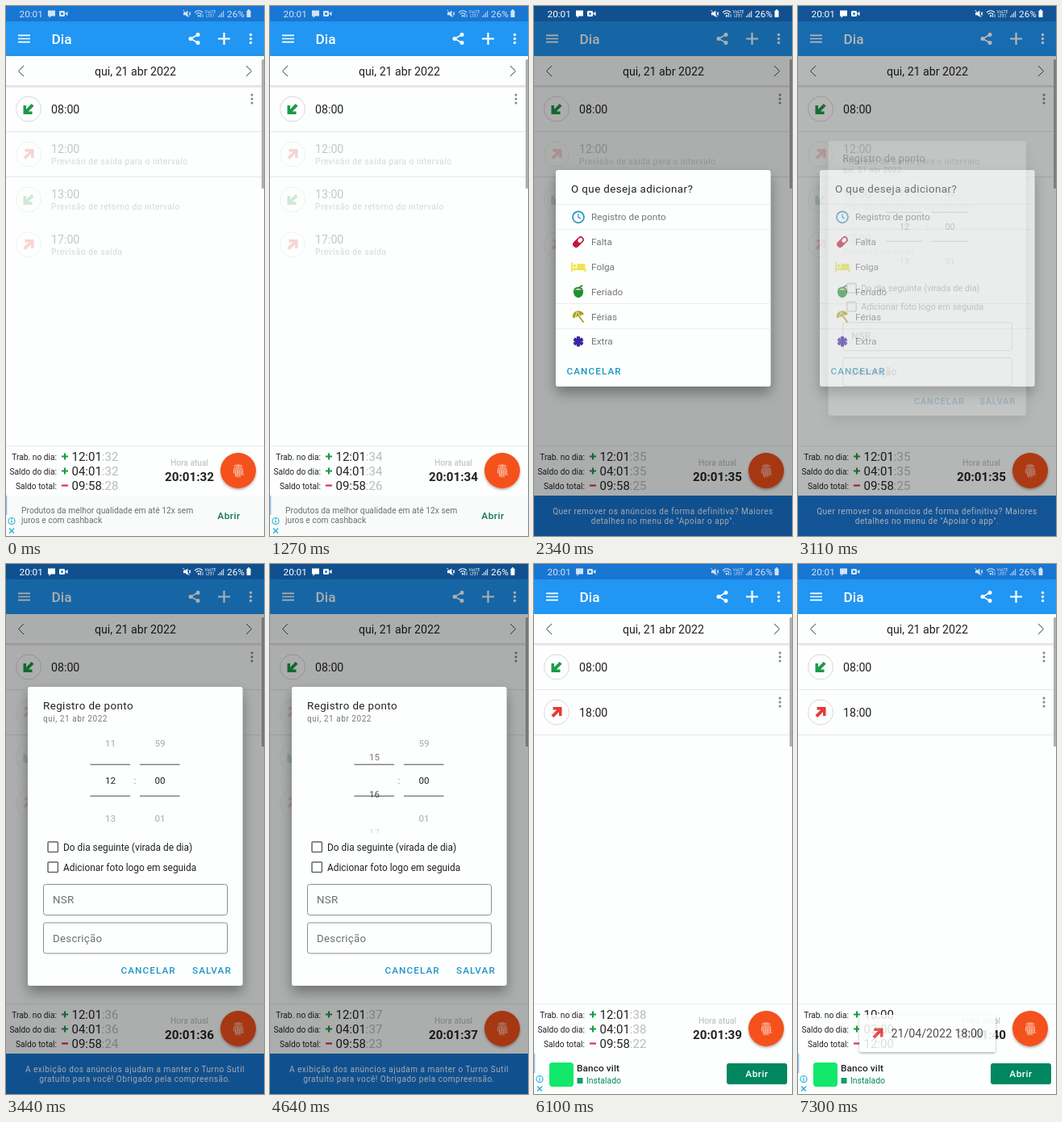
An HTML page for the animation above (7.65 s loop, 320x656 px).

```html
<!DOCTYPE html>
<html lang="pt">
<head>
<meta charset="utf-8">
<title>Registro de ponto</title>
<style>
html, body { margin: 0; width: 100%; height: 100%; overflow: hidden; background: #fdfefe; }
svg { display: block; width: 100%; height: 100%; }
text { font-family: Roboto, "Noto Sans", sans-serif; white-space: pre; }
</style>
</head>
<body>
<svg id="stage" viewBox="0 0 320 656" xmlns="http://www.w3.org/2000/svg"></svg>
<script>
const LOOP = 7650;
const BLUE = '#2196f3', DEEP = '#1976d2', GREEN = '#1a9a48', RED = '#e53935', ACCENT = '#1c94c2', INK = '#222';

const text = (x, y, size, str, fill = INK, more = '') =>
  `<text x="${x}" y="${y}" font-size="${size}" fill="${fill}" ${more}>${str}</text>`;
const rect = (x, y, w, h, fill, more = '') =>
  `<rect x="${x}" y="${y}" width="${w}" height="${h}" fill="${fill}" ${more}/>`;
const dot = (x, y, r, fill, more = '') =>
  `<circle cx="${x}" cy="${y}" r="${r}" fill="${fill}" ${more}/>`;
const path = (d, stroke, width, more = '') =>
  `<path d="${d}" fill="none" stroke="${stroke}" stroke-width="${width}" ${more}/>`;
const at = (x, y, body, more = '') => `<g transform="translate(${x} ${y}) ${more}">${body}</g>`;
const group = (id, body) => `<g id="${id}">${body}</g>`;
const dots = (x, y, gap, r, fill) => [-gap, 0, gap].map(d => dot(x, y + d, r, fill)).join('');
const middle = 'text-anchor="middle"';
const end = 'text-anchor="end"';
const spaced = n => `letter-spacing="${n}"`;
const medium = n => `font-weight="500" ${spaced(n)}`;

// Arrow pointing down-left for an entry, up-right for an exit
const arrow = (x, y, out) => at(x, y,
  `<path d="M-6.5 6.5V-4.5H-3V.2L3.8-6.5L6.5-3.8L-.2 3H4.500V6.500Z" fill="${out ? RED : GREEN}"/>`,
  out ? 'rotate(180)' : '');

const punch = (y, time, out) =>
  dot(28, y, 15.5, '#fff', 'stroke="#d8d8d8"') + arrow(28, y, out) +
  text(56, y + 5.3, 14.2, time) + dots(305, y - 12.5, 5, 1.5, '#858585');

const forecast = (y, time, note, out) =>
  `<g opacity=".2">${dot(28, y, 15.5, '#fff', 'stroke="#bbb"')}${arrow(28, y, out)}</g>` +
  text(56, y - 1.7, 14.2, time, '#c6c8c8') +
  text(56, y + 12.8, 10.2, note, '#d6d8d8', spaced(0.5));

function statusIcons() {
  const c = '#fff';
  const bars = [0, 1, 2, 3].map(i => rect(263 + i * 2, 12 - i * 2, 1.2, 2 + i * 2, c, 'opacity=".75"')).join('');
  return text(16.5, 14, 11.8, '20:01', c) +
    `<path d="M52 5.5h9v7h-5l-2.5 2.3v-2.3H52Z" fill="${c}"/>` +
    rect(66, 6, 7, 7, c, 'rx="1.3"') + `<path d="M73 9.5L76.5 6.7v5.6Z" fill="${c}"/>` + dot(69.5, 9.5, 1.5, DEEP) +
    `<path d="M220 8h2.4l3-2.6v8.4l-3-2.6H220Z" fill="${c}"/>` +
    path('M219.500 5l8 9M227 7.500l2 4M229 7.500l-2 4', c, 0.9) +
    path('M234 8q5-4.500 10 0M235.800 10q3.200-2.600 6.400 0', c, 1.1) + dot(239, 12.3, 1.2, c) +
    path('M241.500 10v4M244 10v4', c, 0.8) +
    text(253.5, 9, 5, 'VoLTE', c, middle) + text(253.5, 14, 5, 'LTE1', c, middle) + bars +
    text(274, 14, 11.8, '26%', c) +
    rect(298.5, 5.5, 5, 8.5, c, 'rx=".8"') + rect(300, 4.3, 2, 1.5, c);
}

function topBar() {
  return rect(0, 0, 320, 19, DEEP) + rect(0, 19, 320, 43, BLUE) +
    path('M15 36.300H30M15 40.500H30M15 44.700H30', '#fff', 1.7) +
    text(56.5, 47, 17.2, 'Dia', '#fff', 'font-weight="500"') +
    path('M238 35.500L229 40.500L238 45.500', '#fff', 1.5) +
    dot(238, 35.5, 2.5, '#fff') + dot(229, 40.5, 2.5, '#fff') + dot(238, 45.5, 2.5, '#fff') +
    path('M263 40.500H278M270.500 33V48', '#fff', 2.2) +
    dots(303.5, 40.5, 5, 1.7, '#fff') +
    rect(0, 62, 320, 37, '#fdfefe') +
    path('M22 74L15.500 80.500L22 87M298 74L304.500 80.500L298 87', '#444', 1) +
    text(160.5, 86, 14.2, 'qui, 21 abr 2022', INK, middle) +
    rect(0, 98.5, 320, 1, '#c9caca') + rect(0, 99.5, 320, 1.5, '#ebecec');
}

function fingerprint() {
  const ridges = [1.7, 3.6, 5.5].map((r, i) =>
    `M${-r} ${4.5 - i}V0A${r} ${r} 0 0 1 ${r} 0V${4 - i * 0.4}Q${r} ${5.8 - i * 0.4} ${r + 1} ${5.8 - i * 0.4}`).join('');
  return path(ridges + 'M0 0V3.500Q0 6.500 2.500 7.500M-1.700 4.500Q-1.500 7-.2 8M-3.600 3.500Q-3.500 6-2.600 7.500M-5-5.800Q0-9 5-5.800',
    '#ffe5da', 0.9, 'stroke-linecap="round"');
}

function footer() {
  const row = (i, label) => {
    const y = 557.5 + i * 18;
    return text(63, y + 4, 10.2, label, INK, end) +
      path(`M69 ${y}h8` + (i < 2 ? `M73 ${y - 4}v8` : ''), i < 2 ? GREEN : '#d32f4f', 2.1) +
      `<text x="81.500" y="${y + 5.3}" font-size="15" fill="${INK}"><tspan id="main${i}"></tspan><tspan id="sec${i}" fill="#b9bbbb"></tspan></text>`;
  };
  return rect(0, 544, 320, 1.2, '#eceeee') +
    ['Trab. no dia:', 'Saldo do dia:', 'Saldo total:'].map((s, i) => row(i, s)).join('') +
    text(227.5, 569, 10.2, 'Hora atual', '#b9bbbb', middle) +
    text(227.5, 587.6, 15.2, '', INK, middle + ' font-weight="700" id="clock"') +
    dot(288, 575, 22, '#f4511e', 'filter="url(#small)"') + at(288, 575.3, fingerprint());
}

const adMarks = rect(0, 606, 1.3, 24, '#8fbdf2') +
  dot(7, 637.5, 4, 'none', 'stroke="#14b0d8" stroke-width="1.100"') +
  path('M7 636.500V640M7 634.700v1M4 646.500l6 6M10 646.500l-6 6', '#14b0d8', 1.2);

const textAd = rect(0, 606, 320, 50, '#f9fafa') + adMarks +
  text(19, 628, 10.3, 'Produtos da melhor qualidade em até 12x sem', '#6d7070') +
  text(19, 640, 10.3, 'juros e com cashback', '#6d7070') +
  text(276.5, 635, 11.8, 'Abrir', '#0b7452', middle + ' ' + medium(0.5));

const appAd = rect(0, 606, 320, 50, '#fdfefe') + adMarks +
  rect(19, 617, 30, 30, '#12e86b', 'rx="4"') +
  text(53, 628, 11.8, 'Banco vilt', INK, medium(0.1)) +
  rect(53.5, 636, 7, 7, '#0f9d6a') +
  text(65, 643, 10.4, 'Instalado', '#01875f') +
  rect(239, 618, 75, 26, '#01875f', 'rx="3"') +
  text(276.5, 635, 11.8, 'Abrir', '#fff', middle + ' ' + medium(0.5));

const notice = (a, b) =>
  text(160, 629, 10, a, '#f4f9fd', middle + ' ' + spaced(0.53)) +
  text(160, 641, 10, b, '#f4f9fd', middle + ' ' + spaced(0.53));

const sheet = (y, h) => rect(27, y, 266.5, h, '#fdfefe', 'rx="3" filter="url(#deep)"');
const heading = (y, str) => text(46, y, 13.4, str, INK, spaced(0.4));
const action = (x, y, str) => text(x, y, 11.7, str, ACCENT, medium(1.1));

const icons = [
  dot(0, 0, 7, 'none', 'stroke="#2590c8" stroke-width="1.700"') + path('M0-4V0L3 2', '#2590c8', 1.3),
  `<g transform="rotate(-45)">${rect(-8, -4, 16, 8, '#c4163d', 'rx="4"')}${rect(0, -2.4, 6.4, 4.8, '#fdfefe', 'rx="2.200"')}</g>`,
  path('M-8-6V6M-8 3H8.500V6', '#efe54c', 1.8) + dot(-4.5, -1.5, 2, '#efe54c') + rect(-1.5, -4, 10, 6, '#efe54c', 'rx="1.500"') + rect(-8, 1.5, 16.5, 2.5, '#efe54c'),
  `<path d="M-6-2.500H6Q7 6 0 7.500Q-7 6-6-2.500Z" fill="#1f9130"/>` + path('M-5-3Q0-7 5-3M1-5L5-8', '#37803a', 1.8),
  `<path d="M-7 2Q-8-5-2-7Q4-8 7-3Z" fill="#aaa31c"/>` + path('M-1-3L6.500 7', '#aaa31c', 1.8) + path('M-3.500 1L-2-6M2-1L-1-6', '#fdfefe', 0.8),
  path([0, 60, 120].map(a => {
    const x = 6.3 * Math.sin(a * Math.PI / 180), y = 6.3 * Math.cos(a * Math.PI / 180);
    return `M${-x} ${-y}L${x} ${y}`;
  }).join(''), '#3a26a5', 4.2)
];

function menu() {
  const names = ['Registro de ponto', 'Falta', 'Folga', 'Feriado', 'Férias', 'Extra'];
  return sheet(203, 268) + heading(231, 'O que deseja adicionar?') +
    [245.5, 276.5, 368.5, 399.5].map(y => rect(27, y - 0.5, 266.5, 1, '#ededed')).join('') +
    names.map((s, i) => {
      const y = 261.3 + i * 30.8;
      return at(55, y, icons[i]) + text(71, y + 4.1, 11.8, s, '#757777');
    }).join('') + action(40.5, 456, 'CANCELAR');
}

function form() {
  const check = (y, label) =>
    rect(52, y - 6.2, 12.4, 12.4, 'none', 'rx="1" stroke="#666" stroke-width="1.500"') + text(71, y + 4.3, 11.9, label);
  const field = (y, label) =>
    rect(46.5, y, 228, 38, 'none', 'rx="3" stroke="#8d8f8f"') + text(58, y + 23.5, 13.3, label, '#6d7070', spaced(0.25));
  return sheet(152, 370) + heading(180, 'Registro de ponto') +
    text(46, 195, 10, 'qui, 21 abr 2022', '#777979', spaced(0.55)) +
    path('M104.500 248.300H154M166 248.300H215.500M104.500 287.300H154M166 287.300H215.500', '#858787', 1.4) +
    text(160, 272, 11.6, ':', '#777', middle) +
    `<g id="wheels" clip-path="url(#wheelClip)"></g>` +
    check(350.3, 'Do dia seguinte (virada de dia)') + check(375.3, 'Adicionar foto logo em seguida') +
    field(396.5, 'NSR') + field(444, 'Descrição') +
    action(142.5, 507, 'CANCELAR') + action(231, 507, 'SALVAR');
}

const shadow = (id, dy, blur, alpha) =>
  `<filter id="${id}" x="-20%" y="-20%" width="140%" height="150%"><feDropShadow dx="0" dy="${dy}" stdDeviation="${blur}" flood-opacity="${alpha}"/></filter>`;

document.getElementById('stage').innerHTML =
  `<defs>${shadow('small', 1.5, 1.5, 0.35)}${shadow('deep', 8, 8, 0.34)}
  <clipPath id="wheelClip">${rect(100, 205, 120, 128, '#000')}</clipPath></defs>` +
  rect(0, 0, 320, 656, '#fdfefe') + topBar() +
  punch(127.5, '08:00', false) +
  rect(0, 155, 320, 1, '#e6e7e7') + rect(0, 211, 320, 1, '#e6e7e7') +
  group('planned',
    forecast(183.5, '12:00', 'Previsão de saída para o intervalo', true) +
    forecast(239.5, '13:00', 'Previsão de retorno do intervalo', false) +
    forecast(295.5, '17:00', 'Previsão de saída', true)) +
  group('saved', punch(183.5, '18:00', true)) +
  rect(317, 66, 4, 160, '#aeb0b0', 'rx="1.500"') +
  footer() + group('textAd', textAd) + group('appAd', appAd) +
  group('notice', rect(0, 606, 320, 50, DEEP) +
    group('noticeA', notice('Quer remover os anúncios de forma definitiva? Maiores', 'detalhes no menu de "Apoiar o app".')) +
    group('noticeB', notice('A exibição dos anúncios ajudam a manter o Turno Sutil', 'gratuito para você! Obrigado pela compreensão.'))) +
  group('toast', rect(76, 558, 169, 46, '#fdfefe', 'rx="2" filter="url(#small)"') +
    arrow(99, 581, true) + text(115.5, 586, 14.2, '21/04/2022 18:00', '#333')) +
  group('dim', rect(0, 0, 320, 656, '#000')) + group('status', statusIcons()) +
  group('menu', menu()) + group('form', form());

const el = {};
document.querySelectorAll('#stage [id]').forEach(e => { el[e.id] = e; });
const show = (id, on) => el[id].setAttribute('display', on ? 'inline' : 'none');
const fade = (id, a) => { el[id].setAttribute('opacity', a); show(id, a > 0); };
const clamp = v => Math.max(0, Math.min(1, v));
const ramp = (t, a, b) => clamp((t - a) / (b - a));
const two = n => String(n).padStart(2, '0');

const runs = [[2040, 2340, 4], [3110, 3440, 5], [4240, 4970, 9], [5070, 5470, 5], [6000, 6200, 3], [6286, 6630, 5]];
const stops = [0, 100, 250, 1270, 7300];
for (const [a, b, n] of runs)
  for (let i = 0; i < n; i++) stops.push(a + (b - a) * i / (n - 1));
stops.sort((a, b) => a - b);
const ticks = [250, 1270, 2240, 3270, 4240, 5270, 6100, 7300];

function wheel(x, value, size) {
  let out = '';
  for (let i = Math.floor(value) - 1; i <= value + 2; i++) {
    const d = i - value;
    out += text(x, 272.2 + d * 46.4, 11.6, two((i + size) % size), INK,
      `${middle} opacity="${clamp(1 - 0.62 * Math.abs(d))}"`);
  }
  return out;
}

function pop(id, a, cy, grow) {
  const s = grow ? 0.9 + 0.1 * a : 1;
  el[id].setAttribute('transform', `translate(160 ${cy}) scale(${s}) translate(-160 ${-cy})`);
  fade(id, a);
}

function draw(now) {
  const t = stops.filter(s => s <= now).pop();
  const sec = 32 + ticks.filter(s => s <= t).length;
  const done = t >= 6200;
  const held = Math.min(sec, 38);
  ['12:01', '04:01', '09:58'].forEach((s, i) => {
    el['main' + i].textContent = done ? ['10:00', '02:00', '12:00'][i] : s;
    el['sec' + i].textContent = done ? '' : ':' + two(i < 2 ? held : 60 - held);
  });
  el.clock.textContent = '20:01:' + sec;

  const closed = t >= 6100;
  show('planned', !closed);
  show('saved', closed);
  show('textAd', t < 2140);
  show('appAd', closed);
  show('notice', t >= 2140 && !closed);
  show('noticeA', t < 3190);
  show('noticeB', t >= 3190);

  const menuA = ramp(t, 1940, 2340) * (1 - ramp(t, 3030, 3300));
  const formA = ramp(t, 3030, 3440) * (1 - ramp(t, 5900, 6100));
  const shade = Math.min(1, menuA + formA);
  pop('menu', menuA, 337, t < 3000);
  pop('form', formA, 337, t < 5000);
  fade('dim', 0.32 * shade);
  fade('status', 0.8 + 0.2 * shade);

  const spin = 1 - Math.pow(1 - ramp(t, 4150, 5470), 2.2);
  el.wheels.innerHTML = wheel(129.5, 12 + 6 * spin, 24) + wheel(191, 0, 60);
  fade('toast', 0.86 * ramp(t, 6110, 6630));
}

function frame() {
  draw(performance.now() % LOOP);
  requestAnimationFrame(frame);
}
frame();
</script>
</body>
</html>
```
